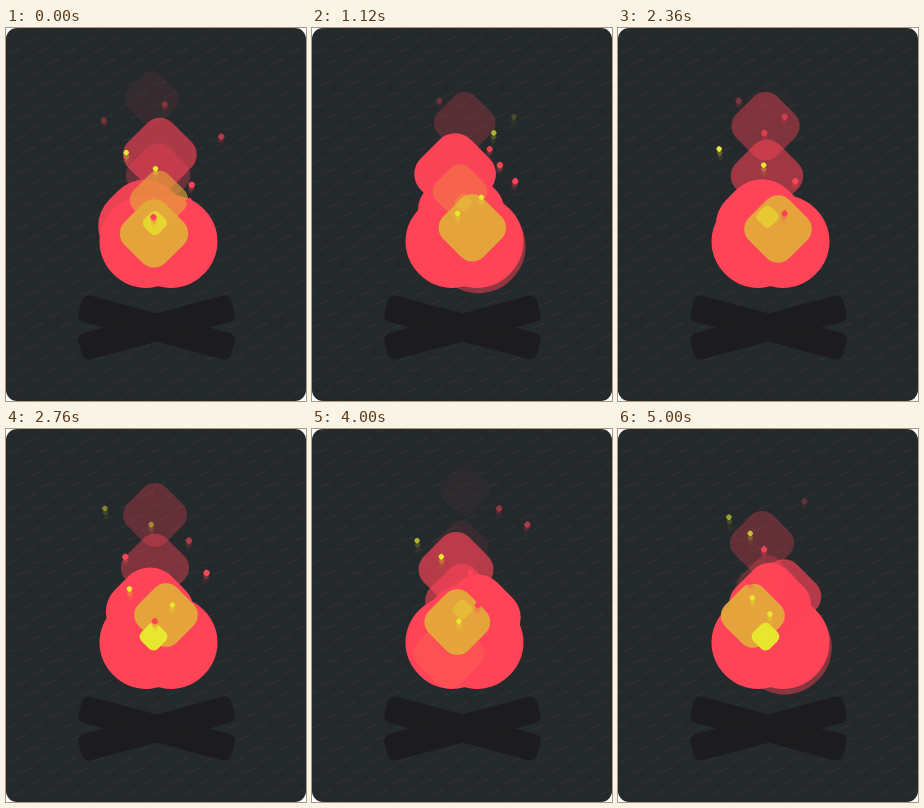
An HTML page with a canvas that plays this animation: 300 px wide and 373 px high, repeating every 5040 ms.

```html
<!DOCTYPE html>
<html>
<head>
<meta charset="utf-8">
<title>Campfire</title>
<style>
html, body { margin: 0; width: 100%; height: 100%; overflow: hidden; background: #fff; }
canvas { display: block; }
</style>
</head>
<body>
<canvas id="stage" width="300" height="373"></canvas>
<script>
const ctx = document.getElementById('stage').getContext('2d');
const LOOP = 5040, STEP = 40;
const RED = '#ff4458', AMBER = '#e4a93a', YELLOW = '#e8e72f';

// Every flame follows the rule of its colour; only these values differ
const redFlames = [
  { start: -3975, x: 146, rise: 150 },
  { start: -3000, x: 152, rise: 81 },
  { start: -2150, x: 156, rise: 138, drift: -5 },
  { start: -300, x: 138, rise: 155, drift: 18 },
  { start: 100, x: 149, rise: 100 },
  { start: 1850, x: 150, rise: 66 },
  { start: 1950, x: 144, rise: 121 },
  { start: 2925, x: 166, rise: 75 },
  { start: 3600, x: 152, rise: 90 }
];
const amberFlames = [
  { start: -1450, x: 153 },
  { start: -550, x: 148 },
  { start: 420, x: 171, drift: -29 },
  { start: 1690, x: 160 },
  { start: 3120, x: 149, drift: -8 },
  { start: 3950, x: 137, drift: -4 }
];

const clamp = v => Math.max(0, Math.min(1, v));

function random(seed) {
  const v = Math.sin(seed * 127.1 + 11.7) * 43758.5453;
  return v - Math.floor(v);
}

function roundRect(x, y, w, h, r) {
  ctx.beginPath();
  ctx.roundRect(x, y, w, h, r);
  ctx.fill();
}

function diamond(x, y, half, alpha, color, round = .28) {
  const side = half / ((.5 - round) * Math.SQRT2 + round);
  ctx.save();
  ctx.globalAlpha = clamp(alpha);
  ctx.fillStyle = color;
  ctx.translate(x, y);
  ctx.rotate(Math.PI / 4);
  roundRect(-side / 2, -side / 2, side, side, side * round);
  ctx.restore();
}

function drawBackground() {
  ctx.clearRect(0, 0, 300, 373);
  ctx.save();
  ctx.beginPath();
  ctx.roundRect(0, 0, 300, 373, 11);
  ctx.clip();
  ctx.fillStyle = '#24292b';
  ctx.fillRect(0, 0, 300, 373);
  ctx.strokeStyle = '#2b3032';
  ctx.lineWidth = 1.5;
  ctx.beginPath();
  for (let row = 0; row < 36; row++) {
    for (let x = (row * 11) % 28 - 20; x < 300; x += 28) {
      ctx.moveTo(x, row * 11 + 3);
      ctx.lineTo(x + 13, row * 11 - 2);
    }
  }
  ctx.stroke();
  ctx.restore();
}

function drawLogs() {
  ctx.fillStyle = '#1c1c1e';
  for (const angle of [.262, -.262]) {
    ctx.save();
    ctx.translate(150.5, 299.5);
    ctx.rotate(angle);
    roundRect(-79, -13.5, 158, 27, 7);
    ctx.restore();
  }
}

// Two steady lobes, fed by a new one from alternating sides
function drawBase(t) {
  for (let k = 0; k < 3; k++) {
    const age = t - 850 - k * 1950;
    if (age < 0 || age > 800) continue;
    const settle = age / 800, side = k % 2 ? -1 : 1;
    diamond(150 + side * (19 - 7 * settle), 221 - 8 * settle, 47, age / 550, RED, .49);
  }
  diamond(140, 213.5, 46.5, 1, RED, .49);
  diamond(165, 213.5, 46.5, 1, RED, .49);
}

function drawRedFlame({ start, x, rise, drift = 0 }, t) {
  const u = (t - start) / 5000;
  if (u < 0 || u > 1) return;
  diamond(x + drift * u, 213 - rise * Math.sin(u * Math.PI / 2), 48.5 - 27 * u,
    Math.min(1, u * 15, 1.9 * (1 - u) ** 2), RED, Math.max(.29, .46 - .5 * u));
}

function drawAmberFlame({ start, x, drift = 0 }, t) {
  const u = (t - start) / 1900;
  if (u < 0 || u > 1) return;
  diamond(x + drift * u, 226 - 71 * u, 35 - 10 * u * u,
    .95 * Math.min(1, u * 5.5, (1 - u) * 2.8), AMBER);
}

function drawYellowCore(t) {
  const age = (t + 308) % 747;
  diamond(147 + age * .006, 212 - age * .055, 14.5 - age * .008,
    Math.min(age / 80, 1.2 - age * .0015), YELLOW);
}

// Sparks fan out while they climb, then go straight up and fade
function drawSparks(t) {
  for (let i = 0; i < 42; i++) {
    const age = t - (i * 155 - 1500), life = 1150 + 400 * random(i + .4);
    if (age < 0 || age > life) continue;
    const u = age / life, yellow = i % 5 < 2;
    const spread = (random(i) - .5) * 130;
    const x = 152 + spread * Math.sin(clamp(u * 1.6) * Math.PI / 2);
    const y = 200 - age * .104;
    const alpha = Math.min(1, (1 - u) * 2.2);
    const size = yellow ? 2.8 : 3.2, gap = yellow ? 4 : 3;
    for (let k = 3; k >= 0; k--) {
      diamond(x - spread * k * .01, y + k * gap, size, alpha * .3 ** k,
        yellow ? YELLOW : RED, .38);
    }
  }
}

function draw(t) {
  drawBackground();
  drawLogs();
  drawBase(t);
  redFlames.forEach(flame => drawRedFlame(flame, t));
  amberFlames.forEach(flame => drawAmberFlame(flame, t));
  drawYellowCore(t);
  drawSparks(t);
}

const began = performance.now();
function frame() {
  const t = (performance.now() - began) % LOOP;
  draw(Math.floor(t / STEP) * STEP);
  requestAnimationFrame(frame);
}
frame();
</script>
</body>
</html>
```
